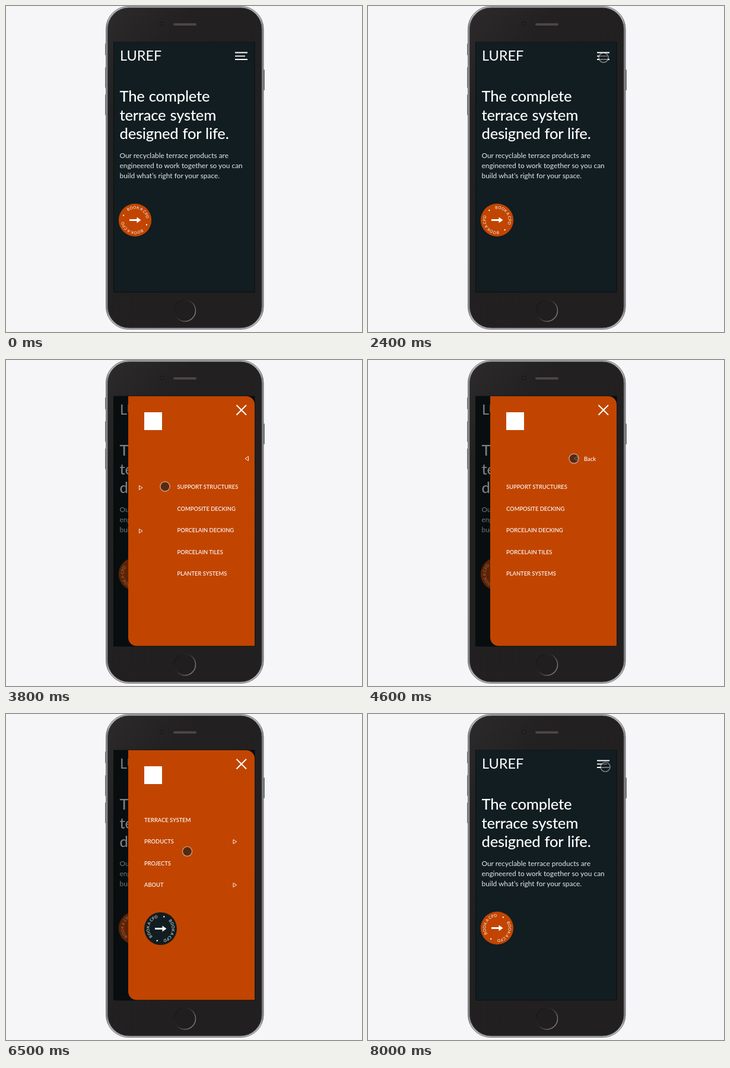
These frames come from a looping animation (600 px wide and 549 px high, 8100 ms). An HTML page:

```html
<!DOCTYPE html>
<html lang="en">
<head>
<meta charset="utf-8">
<style>
  html, body { margin: 0; width: 100%; height: 100%; overflow: hidden; background: #f6f5f8; }
  svg { display: block; width: 600px; height: 549px; font-family: Lato, "Open Sans", sans-serif; }
  text { fill: #fff; }
  .brand { font-size: 23.5px; }
  .title { font-size: 25.6px; font-weight: 500; letter-spacing: -.25px; word-spacing: 1px; }
  .copy { font-size: 11.9px; fill: #e8eaeb; }
  .menu { font-size: 9.4px; font-weight: 500; }
  .ring { font-size: 6.6px; text-anchor: middle; }
  .line { fill: none; stroke: #fff; }
</style>
</head>
<body>
<svg viewBox="0 0 600 549">
  <defs>
    <linearGradient id="rim" x2="1" y2="0">
      <stop offset="0" stop-color="#77787b"/><stop offset=".02" stop-color="#b4b6b8"/>
      <stop offset=".98" stop-color="#b4b6b8"/><stop offset="1" stop-color="#77787b"/>
    </linearGradient>
    <linearGradient id="glass" x2=".6" y2="1">
      <stop offset="0" stop-color="#2d2a2b"/><stop offset=".25" stop-color="#232021"/>
      <stop offset="1" stop-color="#221f20"/>
    </linearGradient>
    <linearGradient id="home" x1="0" y1="0" x2="1" y2=".7">
      <stop offset="0" stop-color="#100e0f"/><stop offset=".5" stop-color="#2c292a"/>
      <stop offset="1" stop-color="#85817f"/>
    </linearGradient>
    <clipPath id="screen"><rect x="181.5" y="61" width="237.5" height="421"/></clipPath>
    <path id="side" d="M206 61H405A14 14 0 0 1 419 75V481.500H220A14 14 0 0 1 206 467.500Z"/>
    <clipPath id="inside"><use href="#side"/></clipPath>
    <path id="arc" d="M-19 0A19 19 0 0 1 19 0"/>
    <g id="face">
      <g id="half"><text class="ring"><textPath href="#arc" startOffset="50%">BOOK A CPD</textPath></text>
        <circle cx="21" r="1.2" fill="#fff"/></g>
      <use href="#half" transform="rotate(180)"/>
    </g>
    <path id="arrow" d="M-9.500-1.500H3V-5L10 0 3 5V1.500H-9.500Z" fill="#fff"/>
  </defs>

  <g fill="#727478">
    <rect x="167" y="63" width="4" height="20" rx="1"/>
    <rect x="167" y="103" width="4" height="35" rx="1"/>
    <rect x="167" y="149" width="4" height="35" rx="1"/>
    <rect x="432" y="107" width="4" height="35" rx="1"/>
  </g>
  <rect x="168.500" y=".5" width="265.500" height="544" rx="38" fill="url(#rim)" stroke="#737477"/>
  <rect x="171.500" y="3" width="259.500" height="539" rx="35.500" fill="url(#glass)" stroke="#403e40"/>
  <circle cx="262.500" cy="30" r="4" fill="#1f1c1d"/>
  <circle cx="262.500" cy="30" r="1.500" fill="#302d35"/>
  <rect x="282" y="29" width="39" height="4" rx="2" fill="#4a4648"/>
  <circle cx="301.500" cy="513" r="18" fill="#211e1f" stroke="url(#home)" stroke-width="1.500"/>
  <rect x="181" y="60.500" width="238.500" height="422" fill="#0a0f11"/>

  <g clip-path="url(#screen)">
    <rect x="182" y="61" width="236.500" height="420.500" fill="#111d21"/>
    <text class="brand" x="192" y="92">LUREF</text>
    <path class="line" stroke-width="1.800" d="M386 78.500H407M386 84.300H403M386 90H407"/>
    <g class="title">
      <text x="191.500" y="161">The complete</text>
      <text x="191.500" y="192.500">terrace system</text>
      <text x="191.500" y="224">designed for life.</text>
    </g>
    <text class="copy" x="191.500" y="255.500">Our recyclable terrace products are</text>
    <text class="copy" x="191.500" y="272.500">engineered to work together so you can</text>
    <text class="copy" x="191.500" y="289.500">build what’s right for your space.</text>
    <g transform="translate(217.500 360.500)">
      <circle r="27.700" fill="#c14500"/><use id="spinA" href="#face"/><use href="#arrow"/>
    </g>

    <rect id="dim" x="181" y="61" width="238" height="421"/>
    <g id="panel">
      <use href="#side" fill="#c14500"/>
      <rect x="233" y="88" width="30" height="30" fill="#fff"/>
      <path class="line" stroke-width="2" d="M388.500 76 405 92.500M405 76 388.500 92.500"/>
      <g clip-path="url(#inside)">
        <g id="main">
          <path class="line" stroke-width=".9" d="M383 211.500 388.500 215 383 218.500ZM383 284.500 388.500 288 383 291.500Z"/>
          <g transform="translate(260.500 361.500)">
            <circle r="27.500" fill="#111d21"/><use id="spinB" href="#face"/><use href="#arrow"/>
          </g>
        </g>
        <g id="sub">
          <path class="line" stroke-width=".9" d="M353 162.500 347.500 166 353 169.500Z"/>
          <text class="menu" x="364" y="170">Back</text>
        </g>
      </g>
    </g>
  </g>
  <circle id="cursor" r="8" fill="#10181b" fill-opacity=".6" stroke="#fff" stroke-opacity=".5" stroke-width="1.400"/>
</svg>
<script>
const LOOP = 8100, STEP = 100;
const $ = id => document.getElementById(id);
const move = (id, x, y = 0) => $(id).setAttribute('transform', `translate(${x} ${y})`);
const spin = (id, deg) => $(id).setAttribute('transform', `rotate(${deg})`);

function list(id, top, items) {
  items.forEach((label, i) => {
    const el = document.createElementNS('http://www.w3.org/2000/svg', 'text');
    el.setAttribute('class', 'menu');
    el.setAttribute('x', 233);
    el.setAttribute('y', top + i * 36.55);
    el.textContent = label;
    $(id).append(el);
  });
}
list('main', 181.7, ['TERRACE SYSTEM', 'PRODUCTS', 'PROJECTS', 'ABOUT']);
list('sub', 217, ['SUPPORT STRUCTURES', 'COMPOSITE DECKING', 'PORCELAIN DECKING',
  'PORCELAIN TILES', 'PLANTER SYSTEMS']);

// cursor path: time, x, y
const path = [
  [1300, 630, 422], [1400, 605, 408], [1800, 432, 256], [1900, 410, 215], [2300, 397, 87],
  [2700, 397, 87], [3100, 325, 144], [3450, 268, 213], [3800, 268, 213], [4500, 347, 166],
  [4900, 347, 166], [5800, 265, 296], [6200, 265, 292], [7200, 400, 90], [LOOP, 400, 89]
];
function cursorAt(t) {
  const i = path.findIndex(p => p[0] > t);
  if (i < 1) return [-50, -50];
  const [a, b] = [path[i - 1], path[i]], k = (t - a[0]) / (b[0] - a[0]);
  return [a[1] + (b[1] - a[1]) * k, a[2] + (b[2] - a[2]) * k];
}

// eased 0..1..0 switch: on from a, off from b
const ease = k => { k = Math.min(1, Math.max(0, k)); return k * k * (3 - 2 * k); };
const toggle = (t, a, b, len) => ease((t - a) / len) - ease((t - b) / len);

function draw(t) {
  const open = toggle(t, 2500, 7400, 400), deep = toggle(t, 3600, 4700, 300);
  move('panel', 214 * (1 - open));
  $('dim').setAttribute('opacity', .5 * open);
  move('main', -214 * deep);
  move('sub', 214 * (1 - deep));
  spin('spinA', 22 + t * .0122);
  spin('spinB', 28 + t * .012);
  move('cursor', ...cursorAt(t));
}

const start = performance.now();
function tick() {
  const t = (performance.now() - start) % LOOP;
  draw(Math.floor(t / STEP) * STEP);
  requestAnimationFrame(tick);
}
tick();
</script>
</body>
</html>
```
